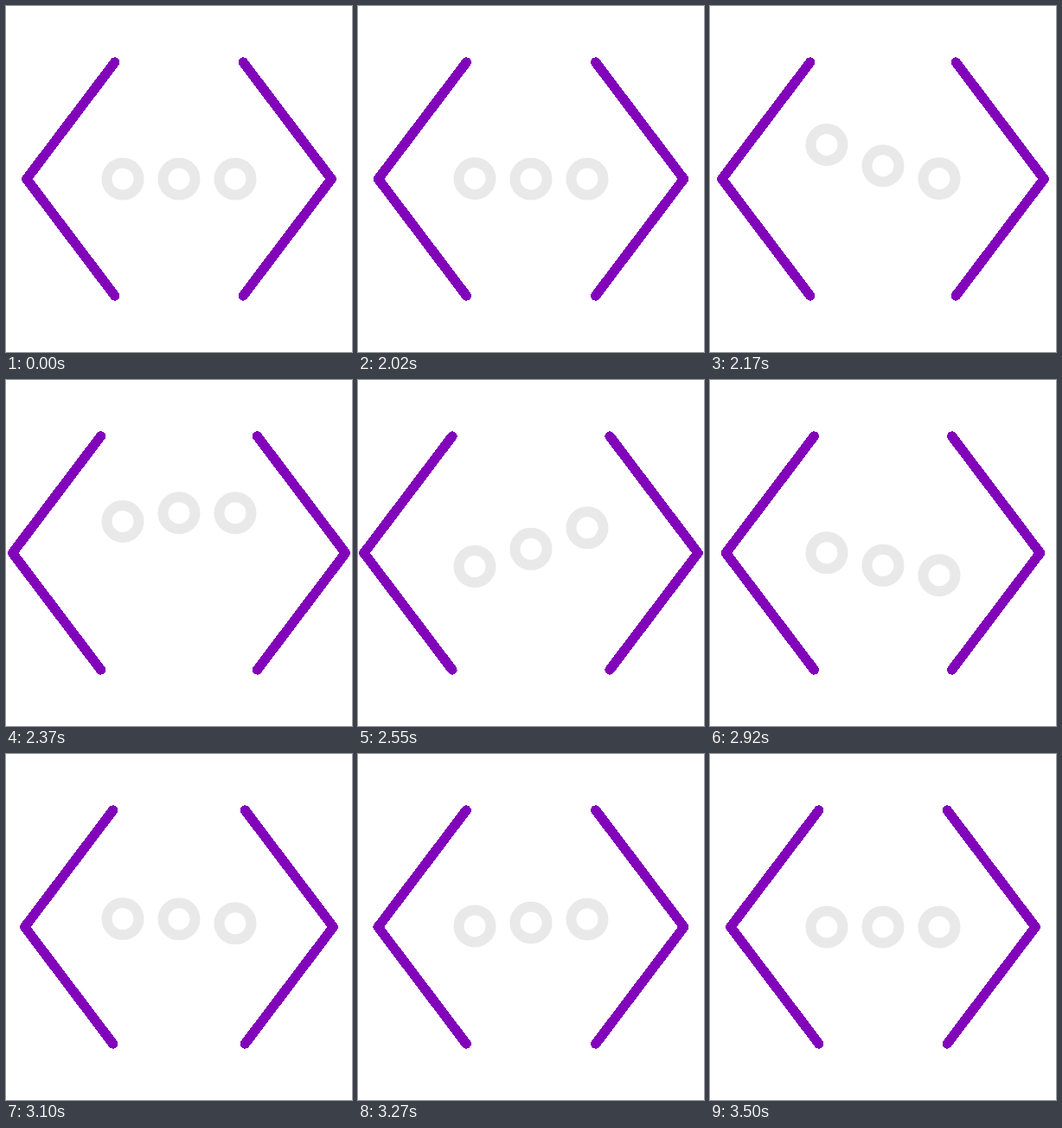
Recreate the animation shown at these times as an HTML page. Size 400x400 px, loop 3.52 s.

```html
<!DOCTYPE html>
<html lang="en">
<head>
<meta charset="utf-8">
<title>Code loader</title>
<style>
  html, body { margin: 0; width: 100%; height: 100%; overflow: hidden; background: #fff; }
  svg { display: block; width: 100vw; height: 100vh; }
</style>
</head>
<body>
<svg viewBox="0 0 400 400" fill="none">
  <g stroke="#8204ba" stroke-width="11.3" stroke-linecap="round" stroke-linejoin="round" shape-rendering="crispEdges">
    <path id="left" d="M125.8 65L23.8 200L125.8 335"/>
    <path id="right" d="M274.2 65L376.2 200L274.2 335"/>
  </g>
  <g id="dots" stroke="#e9e9e9" stroke-width="12">
    <circle cx="135" cy="200" r="18.5"/>
    <circle cx="200" cy="200" r="18.5"/>
    <circle cx="265" cy="200" r="18.5"/>
  </g>
</svg>
<script>
const LOOP = 3520, REST = 2000, STAGGER = 75, SPREAD = 17;
const left = document.getElementById('left');
const right = document.getElementById('right');
const dots = [...document.getElementById('dots').children];

// Turning points of one dot
const bounce = [
  { at: 0, y: 200 },
  { at: 255, y: 152.6 },
  { at: 700, y: 228.5 },
  { at: 1065, y: 190.3 },
  { at: 1350, y: 200 }
];

const clamp = v => Math.min(1, Math.max(0, v));

function bezier(x1, y1, x2, y2) {
  const axis = (a, b, u) => 3 * a * u * (1 - u) ** 2 + 3 * b * u * u * (1 - u) + u ** 3;
  return t => {
    const x = clamp(t);
    let lo = 0, hi = 1;
    for (let i = 0; i < 24; i++) {
      const u = (lo + hi) / 2;
      if (axis(x1, x2, u) < x) lo = u; else hi = u;
    }
    return axis(y1, y2, hi);
  };
}

const ease = bezier(0.25, 0.1, 0.25, 1);
const swing = bezier(0.45, 0, 0.45, 1);

// Each leg adds its eased share of the way to the next turning point
function dotY(t) {
  let y = bounce[0].y;
  for (let i = 1; i < bounce.length; i++) {
    const a = bounce[i - 1], b = bounce[i];
    y += (b.y - a.y) * swing((t - a.at) / (b.at - a.at));
  }
  return y;
}

function draw(ms) {
  const t = ms % LOOP - REST;
  const x = SPREAD * (ease(t / 500) - ease((t - 535) / 965));
  left.setAttribute('transform', `translate(${-x} 0)`);
  right.setAttribute('transform', `translate(${x} 0)`);
  dots.forEach((dot, i) => dot.setAttribute('cy', dotY(t - i * STAGGER)));
}

let start;
function tick(now) {
  start ??= now;
  draw(now - start);
  requestAnimationFrame(tick);
}
draw(0);
requestAnimationFrame(tick);
</script>
</body>
</html>
```
